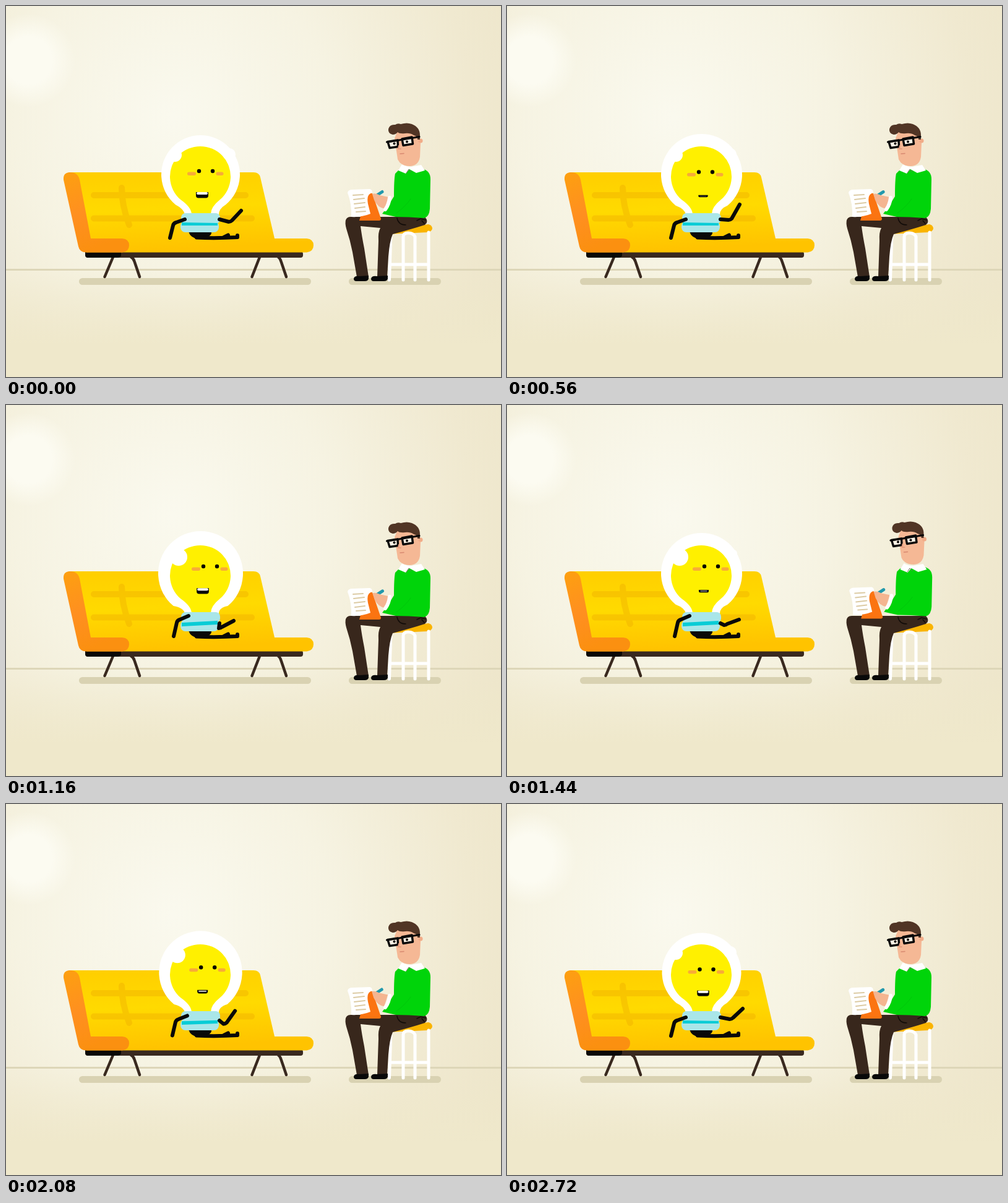
These frames come from a looping animation (800 px wide and 600 px high, 2.76 s). An HTML page:

```html
<!DOCTYPE html>
<html lang="en">
<head>
<meta charset="utf-8">
<title>Couch session</title>
<style>
  html, body { margin: 0; height: 100%; overflow: hidden; background: #f2ecd6; }
  svg { display: block; width: 800px; height: 600px; }
  .line { fill: none; stroke-linecap: round; stroke-linejoin: round; }
  .limb { stroke: #090909; stroke-width: 6; }
</style>
</head>
<body>
<svg viewBox="0 0 800 600">
  <defs>
    <radialGradient id="wall" gradientUnits="userSpaceOnUse" cx="270" cy="180" r="640">
      <stop offset="0" stop-color="#faf9ee"/>
      <stop offset=".4" stop-color="#f6f3e2"/>
      <stop offset=".75" stop-color="#f0e9d0"/>
      <stop offset="1" stop-color="#ede5c9"/>
    </radialGradient>
    <radialGradient id="glow">
      <stop offset=".5" stop-color="#fcfbf1"/>
      <stop offset="1" stop-color="#fcfbf1" stop-opacity="0"/>
    </radialGradient>
    <linearGradient id="floor" x2="0" y2="1">
      <stop offset="0" stop-color="#efe8cb" stop-opacity="0"/>
      <stop offset=".7" stop-color="#efe8cb"/>
    </linearGradient>
    <linearGradient id="cushion" x1="0" y1="0" x2=".15" y2="1">
      <stop offset="0" stop-color="#ffce00"/>
      <stop offset=".5" stop-color="#ffda00"/>
      <stop offset="1" stop-color="#ffc300"/>
    </linearGradient>
    <linearGradient id="side" x1="0" y1="0" x2=".3" y2="1">
      <stop offset="0" stop-color="#fda010"/>
      <stop offset=".55" stop-color="#ff8f20"/>
      <stop offset="1" stop-color="#fb9010"/>
    </linearGradient>
  </defs>

  <rect width="800" height="600" fill="url(#wall)"/>
  <circle cx="36" cy="88" r="76" fill="url(#glow)"/>
  <rect y="426" width="800" height="174" fill="url(#floor)"/>
  <path d="M0 426.500H800" stroke="#ddd6b8" stroke-width="3"/>
  <g fill="#d9d2b2">
    <rect x="118" y="440" width="375" height="11" rx="5.500"/>
    <rect x="554" y="440" width="149" height="11" rx="5.500"/>
  </g>

  <g id="couch">
    <g class="line" stroke="#39291f" stroke-width="4.500">
      <path d="M159.500 438L173 406M202 406Q206 408 207.500 413L216 438"/>
      <path d="M397.500 438L410 406M440 406Q443 408 444.500 413L453 438"/>
    </g>
    <rect x="128" y="397" width="352" height="10" rx="4" fill="#39291f"/>
    <path d="M128 397H186V404Q184 407 180 407H133Q128 407 128 402Z" fill="#090807"/>
    <path d="M104 269H400Q409 269 411 277L434 376H486Q497 377 497 387T486 398.500H130Z" fill="url(#cushion)"/>
    <g class="line" stroke="#eca900" stroke-opacity=".38" stroke-width="10">
      <path d="M142 306H387M142 343.500H397M187 294Q187 322 199 354M357 294V306"/>
    </g>
    <path d="M102 269Q116 268 119 281L137 376H188Q199 377 199 387T188 398.500H129Q119 398 117 389L93 281Q92 270 102 269Z" fill="url(#side)"/>
  </g>

  <g id="bulb">
    <path id="glass" fill="#fff"/>
    <path d="M282 313A49 49 0 1 1 346 313Q331 325 331 336H300Q299 325 282 313Z" fill="#fff000"/>
    <circle id="shineLeft" fill="#fff"/>
    <circle id="shineRight" cy="240" fill="#fff"/>
    <g id="face">
      <g fill="#f8ab38">
        <rect x="291" y="270" width="14" height="5.500" rx="2.700"/>
        <rect x="337.500" y="270" width="12" height="5.500" rx="2.700"/>
      </g>
      <circle cx="310" cy="268.500" r="3.200"/>
      <circle cx="332" cy="268.500" r="3.200"/>
    </g>
    <path id="lips" fill="#090909"/>
    <path id="teeth" class="line" stroke="#fff"/>
    <path d="M295 365H332Q333 371 325 374L311 377Q298 375 295 365Z" fill="#090909"/>
    <path class="line limb" d="M308 374.500Q340 376 374 374V371M352 374L359 370.500"/>
    <g fill="#a9e6e9">
      <rect x="283" y="335" width="63" height="17" rx="7"/>
      <rect x="282" y="348" width="62" height="18" rx="8"/>
    </g>
    <path id="thread" fill="#08ccd6"/>
    <path id="armLeft" class="line limb"/>
    <path id="armRight" class="line limb"/>
  </g>

  <g id="man">
    <path d="M617 369L620 361L683 353Q689 355 689 360Q688 365 681 366Z" fill="#fab400"/>
    <g class="line" stroke="#fff" stroke-width="5">
      <path d="M622 369L619.500 443M642 443V373Q642 367 650 367T661 373V443M683 366V443M621 418H683"/>
    </g>
    <path d="M557 341H677Q684 349 677 354Q655 361 625 369Q620 380 618 405L616 438H600L602 380Q601 366 605 359L573 356Q575 372 579 392L586 438H567L560 398Q556 378 550 360Q545 341 557 341Z" fill="#38271c"/>
    <g fill="#090909">
      <path d="M562 441Q563 436 571 437L586 436V441Q585 445 580 445H566Q562 445 562 441Z"/>
      <path d="M590 441Q591 436 599 437L617 436V441Q616 445 611 445H594Q590 445 590 441Z"/>
    </g>
    <path class="line" d="M632 343Q634 354 646 354M664 347L670 344L678 346M672 347L676 352" stroke="#120c08" stroke-width="1.500"/>

    <g id="torso">
      <path d="M634 266Q650 260 672 263Q686 266 686 280L685 328Q684 341 676 343Q650 341 630 341L608 336L615 327L627 308Q627 280 629 271Z" fill="#00d40a"/>
      <path class="line" d="M654 312Q645 325 631 335" stroke="#00b50c" stroke-width="1" stroke-opacity=".5"/>
      <path d="M571 347L584 302L592 303L606 344Q606 347 603 347Z" fill="#fb7411"/>
      <path d="M552 302Q553 297 560 297L588 296Q592 297 592 302Q582 304 585 320L589 336Q574 342 558 341Q559 320 552 302Z" fill="#fff"/>
      <path class="line" d="M561 306L577 305M562 313L579 311M563 320L580 318M564 327L580 325M566 333L581 332" stroke="#dccba4" stroke-width="2"/>
      <g id="hand">
        <path class="line" d="M598 307L608 300.500" stroke="#2299ad" stroke-width="5"/>
        <path d="M592 304Q597 302 604 306L618 309L612 328Q601 326 595 314Z" fill="#f4b591"/>
      </g>
      <path class="line" d="M620 310Q619 321 613 329" stroke="#fff" stroke-width="6"/>
    </g>

    <path id="collar" d="M640 256Q646 260 655 260L671 257L677 266L663 270L652 264L646 271L634 266Z" fill="#fff"/>
    <path class="line" d="M647 270L651 264L655 268" stroke="#746a5d" stroke-width="1"/>
    <g id="head">
      <path d="M628 214L632 204H667L670 222L669 244Q667 258 653 259Q638 259 633 248Z" fill="#f5b895"/>
      <circle cx="670" cy="218" r="3.500" fill="#f1ac88"/>
      <path d="M625 208Q617 206 618 199Q620 191 629 192Q633 189 638 191Q648 188 656 191Q669 196 669 209L669 216H665Q666 211 659 209Q653 205 645 206Q636 207 633 204Q630 208 625 208Z" fill="#513525"/>
      <g fill="#fff4e6" stroke="#090909" stroke-width="3.500" stroke-linejoin="round">
        <path d="M617 219.500L633 217L633.500 227.500L620 229.500Z"/>
        <path d="M640 215L656 212L657.500 223L642 225.500Z"/>
      </g>
      <path class="line" d="M615.500 220L635 217L668 211.500" stroke="#090909" stroke-width="3.200"/>
      <circle cx="627.500" cy="222.500" r="2"/><circle cx="648" cy="219.500" r="2"/>
      <path class="line" d="M635 226L634 231L638 231" stroke="#e69c7e" stroke-width="2"/>
      <path class="line" d="M637 239L643 238.500" stroke="#d88970" stroke-width="1.500"/>
    </g>
  </g>
</svg>
<script>
const LOOP = 2760;
const el = id => document.getElementById(id);
const set = (id, attrs) => {
  for (const name in attrs) el(id).setAttribute(name, attrs[name]);
};
const mix = (a, b, k) => a + (b - a) * k;
const smooth = k => k * k * (3 - 2 * k);

// time, glass radius, face x, face y, elbow x, y, hand x, y, turn
const poses = [
  [0, 63.5, 2, -1.5, 363, 349, 380, 331, 0],
  [560, 65.5, 0, 0, 361, 346, 376, 321, 0],
  [780, 66.5, 0, 0, 361, 346, 376, 321, 0],
  [980, 68, 9, -7.5, 348, 361, 368, 349, 1],
  [1160, 68.5, 9, -7.5, 347, 361, 368, 349, 1],
  [1440, 65.5, 9, -7.5, 354, 356, 375, 347, 1],
  [1800, 66.5, 8, -6.5, 351, 361, 367, 342, 1],
  [2000, 67, 8, -6.5, 351, 361, 367, 342, 1],
  [2200, 67.5, 0, 0, 361, 346, 376, 321, 0],
  [2360, 67.5, 0, 0, 361, 346, 376, 321, 0],
  [2720, 64, 1.5, -1, 363, 348, 381, 331, 0],
  [LOOP, 63.5, 2, -1.5, 363, 349, 380, 331, 0]
];

function poseAt(t) {
  const i = poses.findIndex(p => p[0] > t);
  const [from, to] = [poses[i - 1], poses[i]];
  const k = smooth((t - from[0]) / (to[0] - from[0]));
  return from.map((v, n) => mix(v, to[n], k));
}

function drawBulb(t) {
  const [, r, faceX, faceY, elbowX, elbowY, handX, handY, turn] = poseAt(t);
  const cx = 314.5, cy = 272.5;
  const dx = r * .64, y = cy + r * .768;
  set('glass', { d: `M${cx - dx} ${y}A${r} ${r} 0 1 1 ${cx + dx} ${y}Q344 328 344 337H289Q287 328 ${cx - dx} ${y}Z` });
  set('shineLeft', { cx: mix(273, 279, turn), cy: mix(241, 246, turn), r: mix(11, 14, turn) });
  set('shineRight', { cx: mix(361, 366, turn), r: mix(10, 6, turn) });
  set('face', { transform: `translate(${faceX} ${faceY})` });

  const open = .5 + .5 * Math.cos(t / LOOP * 14 * Math.PI);
  const w = mix(7.5, 10, open), h = mix(3, 9.5, open);
  const mx = 317 + turn, my = mix(306, 301.5, open) + mix(faceY, faceY * .85, turn) + open;
  const corner = Math.min(4, h * .6);
  set('lips', { d: `M${mx - w} ${my}H${mx + w}V${my + h - corner}Q${mx + w} ${my + h} ${mx + w - corner} ${my + h}H${mx - w + corner}Q${mx - w} ${my + h} ${mx - w} ${my + h - corner}Z` });
  set('teeth', { d: `M${mx - w + 3} ${my + 2}H${mx + w - 3}`, 'stroke-width': mix(0, 4, open) });

  const shift = 6 * turn;
  set('armLeft', { d: `M${289 + shift} ${345 - 4 * turn}L${275 + shift} ${350 - 3 * turn}Q${271 + shift} ${351 - 3 * turn} ${270 + shift} ${355 - 3 * turn}L${265 + shift} ${375 - turn}` });
  set('armRight', { d: `M345 ${mix(345, 353, turn)}L${elbowX - 3} ${elbowY}Q${elbowX} ${elbowY} ${elbowX + 2} ${elbowY - 2}L${handX} ${handY}` });
  set('thread', { d: `M284 ${mix(350, 352, turn)}L342 ${mix(351, 349, turn)}V${mix(355, 355, turn)}L284 ${mix(355, 358, turn)}Z` });
}

function drawMan(t) {
  const lift = t > 1200 && t < 1700 ? Math.sin((t - 1200) / 500 * Math.PI) : 0;
  set('head', { transform: `translate(${4.5 * lift} ${-lift})` });
  set('torso', { transform: `translate(${1.2 * lift} ${-1.5 * lift})` });
  set('collar', { transform: `translate(${1.5 * lift} 0)` });
  const stroke = t / LOOP * 2 * Math.PI * 5;
  set('hand', { transform: `translate(${.8 * Math.sin(stroke)} ${.5 * Math.sin(stroke)})` });
}

function frame(now) {
  const t = Math.floor(now % LOOP / 40) * 40;
  drawBulb(t);
  drawMan(t);
  requestAnimationFrame(frame);
}
requestAnimationFrame(frame);
</script>
</body>
</html>
```
